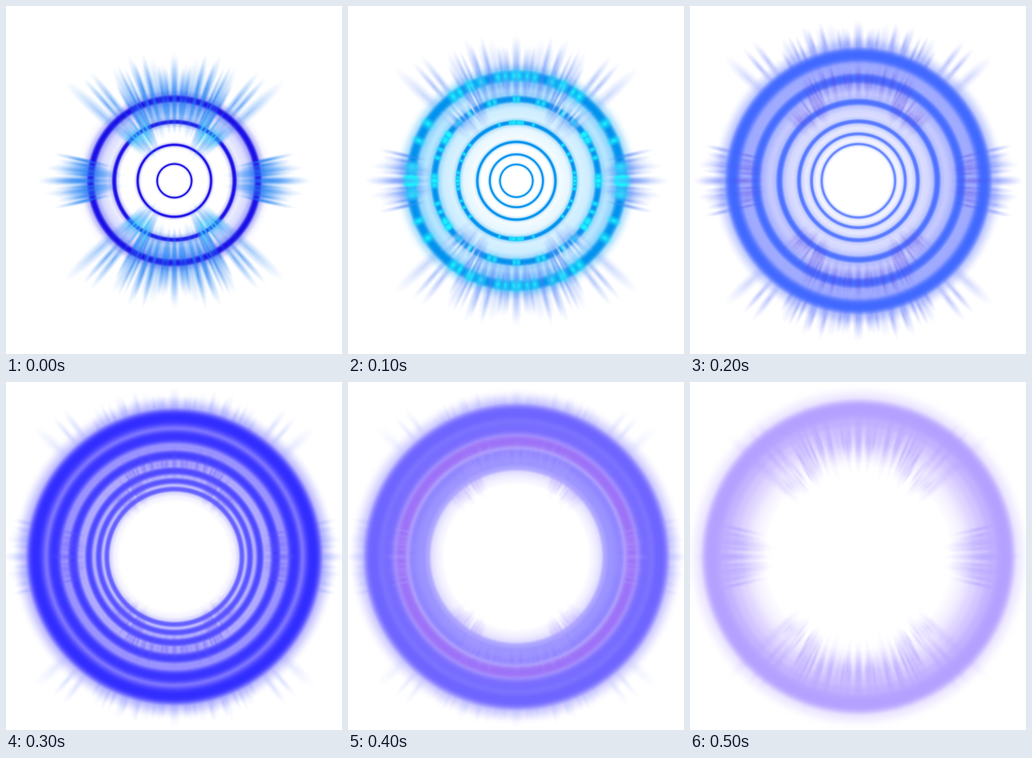
Animation of 430 by 444 pixels, one loop 0.6 s. Source, as an HTML page with a canvas:

```html
<!DOCTYPE html>
<html lang="en">
<head>
<meta charset="utf-8">
<title>Energy rings</title>
<style>
html, body { margin: 0; width: 100%; height: 100%; overflow: hidden; background: #fff; }
canvas { display: block; }
</style>
</head>
<body>
<canvas id="stage" width="430" height="444"></canvas>
<script>
const W = 430, H = 444, STEP = 100;

// Radii of the rings at the start; the last two emerge later.
const STARTS = [107, 77, 47, 22, 6, -7];

// Fans of rays in one quadrant, mirrored into the others.
const FANS = {
  side:   { from: 0,  to: 14, count: 6,  far: 1,    shift: 35 },
  corner: { from: 42, to: 57, count: 3,  far: 1.13, shift: 0 },
  crown:  { from: 59, to: 90, count: 13, far: 1,    shift: 20 }
};
const BUNDLE = { from: 42, to: 66, count: 10, shift: 0 };

// travel: how far rings have moved out; hollow: clear centre; root: where rays begin;
// flare: where the short inner rays begin; fade: loss of strength from ring to ring.
const SCENES = [
  { ring: '25,15,230', glow: '105,115,255', ray: '40,130,242', flare: '45,140,245', glint: '50,230,255',
    travel: 0, hollow: 78, fill: .4, root: 55, force: .75, flareAt: 34, flareForce: .65, fade: 1 },
  { ring: '0,145,238', glow: '115,205,255', ray: '105,145,248', flare: '95,135,245', glint: '255,255,255', spark: '30,245,255',
    travel: 28, hollow: 48, fill: .6, root: 95, force: .6, flareAt: 72, flareForce: .5, fade: 1 },
  { ring: '65,105,255', glow: '110,120,255', ray: '100,120,250', flare: '85,65,225',
    travel: 54, hollow: 42, fill: .6, root: 140, force: .5, flareAt: 78, flareForce: .4, fade: .94 },
  { ring: '50,45,255', glow: '130,115,255', ray: '165,180,255', flare: '95,80,250',
    travel: 92, hollow: 70, fill: .8, root: 165, force: .45, flareAt: 70, flareForce: .4, fade: .92 },
  { ring: '110,100,255', glow: '140,125,255', ray: '190,200,255', flare: '175,155,255', tint: '145,90,245',
    travel: 119, hollow: 92, fill: .75, root: 170, force: .4, flareAt: 82, flareForce: .4, fade: .82 },
  { ring: '180,160,255', glow: '205,185,255', ray: '178,160,255', flare: '180,165,255',
    travel: 145, hollow: 118, fill: .6, root: 98, force: .5, flareAt: 98, flareForce: .4, fade: .5 }
];

function seeded(seed) {
  return () => (seed = seed * 16807 % 2147483647) / 2147483647;
}

// Annulus whose alpha follows a function of the position between r0 and r1.
function radial(ctx, r0, r1, color, alphaAt, steps = 24) {
  const g = ctx.createRadialGradient(0, 0, r0, 0, 0, r1);
  for (let i = 0; i <= steps; i++) {
    const p = i / steps;
    g.addColorStop(p, `rgba(${color},${alphaAt(p).toFixed(3)})`);
  }
  ctx.fillStyle = g;
  ctx.beginPath();
  ctx.arc(0, 0, r1, 0, Math.PI * 2);
  if (r0) ctx.arc(0, 0, r0, 0, Math.PI * 2, true);
  ctx.fill();
}

function drawGlow(ctx, { glow, hollow, fill }, rim) {
  radial(ctx, hollow, rim, glow, p => fill * p ** .8);
  radial(ctx, rim, rim + 10 + rim / 9, glow, p => fill * (1 - p) ** 2);
}

const ringWidth = r => 1.5 + 10.5 * (r / 162) ** 2;

function drawRing(ctx, r, color, alpha) {
  const band = (w, a, flat) =>
    radial(ctx, r - w, r + w, color, p => a * (1 - Math.abs(2 * p - 1) ** flat) ** 2);
  const w = ringWidth(r);
  band(w * 2.2, alpha * .3, 2);
  band(w, alpha, 2.7);
}

function drawRay(ctx, angle, r0, r1, w, color, alpha) {
  for (const sx of [1, -1]) for (const sy of [1, -1]) {
    ctx.save();
    ctx.scale(sx, sy);
    ctx.rotate(-angle * Math.PI / 180);
    ctx.translate((r0 + r1) / 2, 0);
    ctx.scale((r1 - r0) / 2, w);
    radial(ctx, 0, 1, color, p => alpha * (1 - p) ** 1.3, 8);
    ctx.restore();
  }
}

// Broad rays come out pale, narrow ones strong.
function drawFan(ctx, { from, to, count }, r0, r1, size, color, alpha) {
  const rnd = seeded(4217 + from * 31);
  const slack = (r1 - r0) * .25;
  for (let i = 0; i < count; i++) {
    const angle = from + (to - from) * (i + .15 + rnd() * .7) / count;
    const broad = rnd() ** 2;
    drawRay(ctx, angle, r0 + rnd() * slack, r1 - rnd() * slack,
      size * (1 + broad * 1.5), color, alpha * (1 - broad * .45));
  }
}

// Bright spots along a ring, crowding towards the axes.
function drawSparks(ctx, r, color) {
  const rnd = seeded(900 + Math.round(r));
  const w = ringWidth(r);
  for (let i = 0; i < r / 8; i++) {
    const angle = 45 * (1 - Math.cos(Math.PI * rnd()));
    drawRay(ctx, angle, r - w * 1.4, r + w * 1.4, w * (.7 + rnd() * .5), color, 1);
  }
}

function render(scene, i) {
  const layer = document.createElement('canvas');
  layer.width = W;
  layer.height = H;
  const ctx = layer.getContext('2d');
  ctx.fillStyle = '#fff';
  ctx.fillRect(0, 0, W, H);
  ctx.translate(215.5, 223);
  ctx.scale(1, 1 - .023 * Math.exp(-i));

  const squeeze = Math.min(1, 1 - .2 * (i - 2));
  const radii = STARTS.map(s => s * squeeze + scene.travel).filter(r => r > 20);
  const reach = 180 + 44 * Math.sin(i * Math.PI / 7);

  drawGlow(ctx, scene, radii[0]);
  for (const fan of Object.values(FANS))
    drawFan(ctx, fan, scene.root, reach * fan.far, 4.2, scene.ray, scene.force);

  radii.forEach((r, n) => {
    const color = n === 2 && scene.tint || scene.ring;
    drawRing(ctx, r, color, scene.fade ** n);
    if (scene.spark && r > 70) drawSparks(ctx, r, scene.spark);
  });

  const { flareAt, flareForce } = scene;
  for (const fan of [BUNDLE, FANS.side, FANS.crown]) {
    const r0 = flareAt + fan.shift;
    drawFan(ctx, fan, r0, r0 + 58 + 30 * Math.exp(-i), 3, scene.flare, flareForce);
  }
  if (scene.glint)
    drawFan(ctx, { ...BUNDLE, count: 6 }, flareAt + 18, flareAt + 66, 2.2, scene.glint, .8);
  return layer;
}

const layers = SCENES.map(render);
const stage = document.getElementById('stage').getContext('2d');

function tick() {
  const i = Math.floor(performance.now() / STEP) % layers.length;
  stage.drawImage(layers[i], 0, 0);
  requestAnimationFrame(tick);
}
tick();
</script>
</body>
</html>
```
